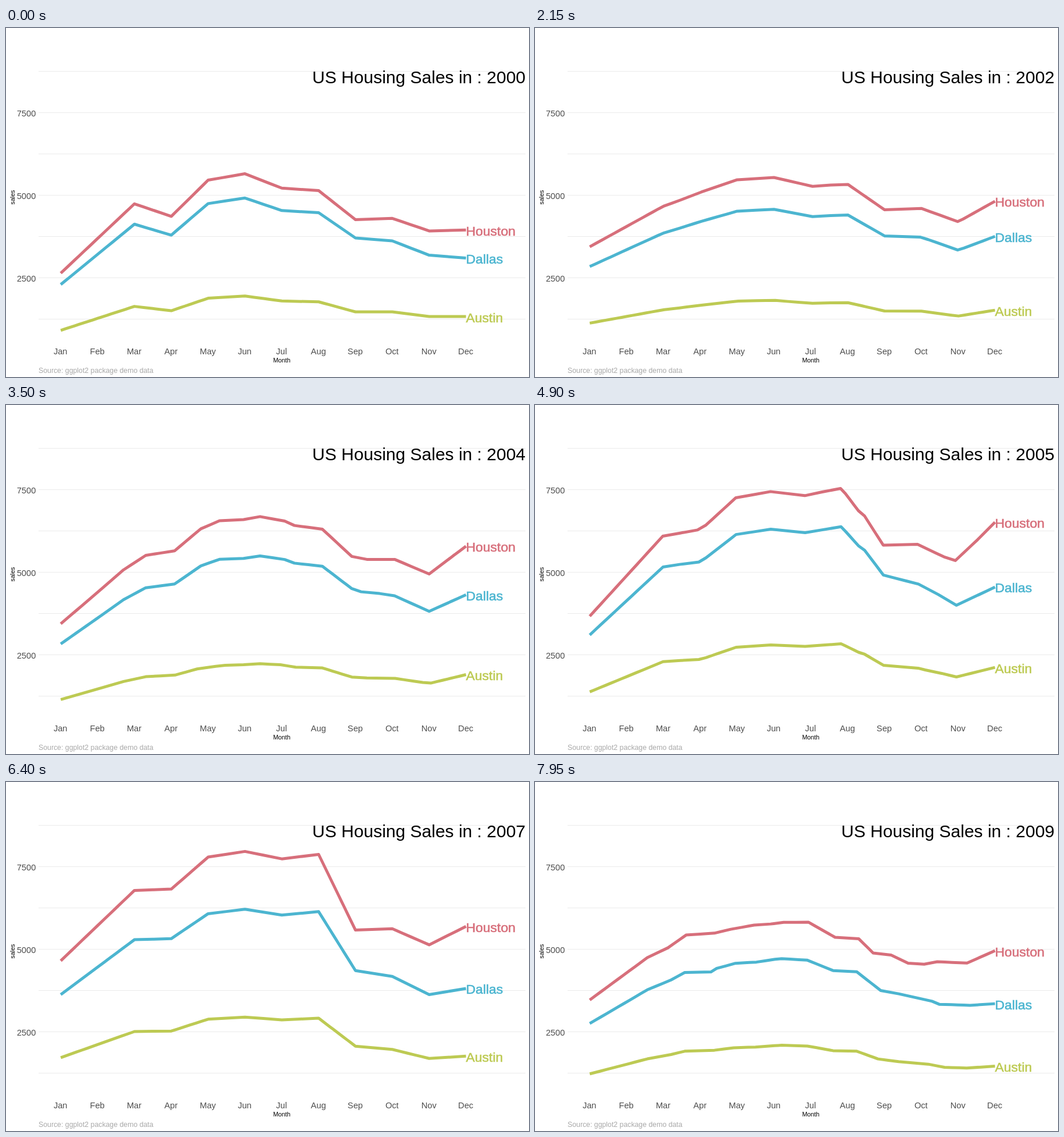
Animation of 900 by 600 pixels, one loop 8 s. Source, as an HTML page:

```html
<!DOCTYPE html>
<html lang="en">
<head>
<meta charset="utf-8">
<title>US Housing Sales</title>
<style>
html, body { margin: 0; width: 100%; height: 100%; overflow: hidden; background: #fff; }
svg { display: block; width: 900px; height: 600px; font-family: "Liberation Sans", Arial, sans-serif; }
polyline { fill: none; stroke-width: 5; stroke-linejoin: round; }
.grid { stroke: #ebebeb; stroke-width: 1.1; }
.tick { font-size: 14.67px; fill: #4d4d4d; }
.axis { font-size: 10.67px; text-anchor: middle; }
.city { font-size: 22.9px; stroke-width: .6; }
</style>
</head>
<body>
<svg id="chart" viewBox="0 0 900 600"></svg>
<script>
const LOOP = 8000, STEP = 50, POINTS = 50;
const chart = document.getElementById('chart');
const monthX = m => 94.2 + 63.4 * m;
const salesY = v => 571.5 - v * .0568;
const lerp = (a, b, p) => a + (b - a) * p;
const mix = (a, b, p) => a.map((v, i) => lerp(v, b[i], p));

function add(tag, attrs, text = '') {
  const el = document.createElementNS('http://www.w3.org/2000/svg', tag);
  for (const key in attrs) el.setAttribute(key, attrs[key]);
  el.textContent = text;
  return chart.appendChild(el);
}

// Static chart parts
for (let v = 1250; v <= 8750; v += 1250) {
  const y = Math.floor(salesY(v)) + .5;
  add('line', { class: 'grid', x1: 56, x2: 894, y1: y, y2: y });
  if (v % 2500 === 0) add('text', { class: 'tick', x: 51.3, y: y + 6, 'text-anchor': 'end' }, v);
}
'Jan Feb Mar Apr May Jun Jul Aug Sep Oct Nov Dec'.split(' ').forEach((name, m) =>
  add('text', { class: 'tick', x: monthX(m) - .5, y: 561, 'text-anchor': 'middle' }, name));
add('text', { class: 'axis', x: 474.5, y: 575 }, 'Month');
add('text', { class: 'axis', transform: 'translate(15 291) rotate(-90)' }, 'sales');
add('text', { x: 56, y: 593, 'font-size': 12.3, fill: '#a9a9a9' }, 'Source: ggplot2 package demo data');

const lines = [['Houston', '#d76f7b'], ['Dallas', '#4cb5d0'], ['Austin', '#bdca53']]
  .map(([name, color]) => ({ name, color, path: add('polyline', { stroke: color }) }));
for (const l of lines)
  l.label = add('text', { class: 'city', x: 791.6, fill: l.color, stroke: l.color }, l.name);
const title = add('text', { x: 894, y: 95, 'font-size': 30, 'text-anchor': 'end' });

// Twelve months of sales from the turning points of the season
function season(jan, mar, apr, jun, aug, sep, dec) {
  return [jan, (jan + mar) / 2, mar, apr, lerp(apr, jun, .85), jun,
    (jun + aug) / 2 - 180, aug, sep, sep + 40, sep * .92, dec];
}

// A smaller city sells a steady share of the largest, drifting to another by December
const scaled = (sales, [share, decShare]) =>
  sales.map((v, m) => v * lerp(share, decShare, Math.max(0, m - 8) / 3));

// Subdivide a path to POINTS vertices, giving steep edges more of them
function subdivide(path) {
  const weight = path.slice(1).map((p, i) => Math.abs(p[1] - path[i][1]) + .01);
  const total = weight.reduce((a, b) => a + b);
  const extra = POINTS - path.length;
  const out = [path[0]];
  let sum = 0, used = 0;
  weight.forEach((w, i) => {
    sum += w;
    const upTo = Math.round(extra * sum / total);
    const n = upTo - used + 1;
    used = upTo;
    for (let j = 1; j <= n; j++) out.push(mix(path[i], path[i + 1], j / n));
  });
  return out;
}

const years = [];
function year(turns, dallas, austin) {
  const sales = season(...turns);
  years.push([sales, scaled(sales, dallas), scaled(sales, austin)]
    .map(row => subdivide(row.map((v, m) => [monthX(m), salesY(v)]))));
}
year([2640, 4740, 4360, 5650, 5140, 4260, 3950], [.87, .784], [.345, .336]);
year([2790, 4670, 4710, 5490, 5550, 4050, 4290], [.875, .815], [.335, .34]);
year([3440, 4660, 5070, 5500, 5270, 4520, 4770], [.825, .78], [.328, .314]);
year([3440, 4780, 5130, 6010, 6200, 5100, 5450], [.84, .77], [.33, .334]);
year([3440, 5680, 5780, 6980, 6510, 5500, 5940], [.815, .736], [.335, .326]);
year([3620, 6070, 6250, 7430, 7500, 5720, 6540], [.848, .695], [.375, .323]);
year([4250, 6630, 6540, 8090, 7770, 6400, 6220], [.82, .745], [.385, .352]);
year([4650, 6780, 6820, 7960, 7870, 5580, 5690], [.78, .67], [.37, .31]);
year([4160, 5570, 5910, 6630, 6050, 3720, 4690], [.8, .7], [.365, .28]);
year([3030, 4900, 4840, 6300, 6000, 5230, 5120], [.79, .663], [.345, .303]);

// Moves between years: the first three take one step more than the rest
const moves = years.slice(1).map((to, i) => ({
  start: 250 + 900 * i + STEP * Math.min(i, 3),
  steps: i < 3 ? 14 : 13
}));

function draw(now) {
  requestAnimationFrame(draw);
  const t = Math.floor(now % LOOP / STEP) * STEP;
  const k = Math.max(0, moves.findLastIndex(m => m.start <= t));
  const { start, steps } = moves[k];
  const done = (t - start) / STEP + 1;
  const p = Math.min(1, Math.max(0, done / steps));

  lines.forEach((l, c) => {
    const pts = years[k][c].map((pt, i) => mix(pt, years[k + 1][c][i], p));
    l.path.setAttribute('points', pts.map(pt => pt.map(v => v.toFixed(2))).join(' '));
    l.label.setAttribute('y', pts[POINTS - 1][1] + 9.5);
  });
  // The year flips halfway through each move
  title.textContent = 'US Housing Sales in : ' + (2000 + k + (done >= 7));
}
draw(performance.now());
</script>
</body>
</html>
```
